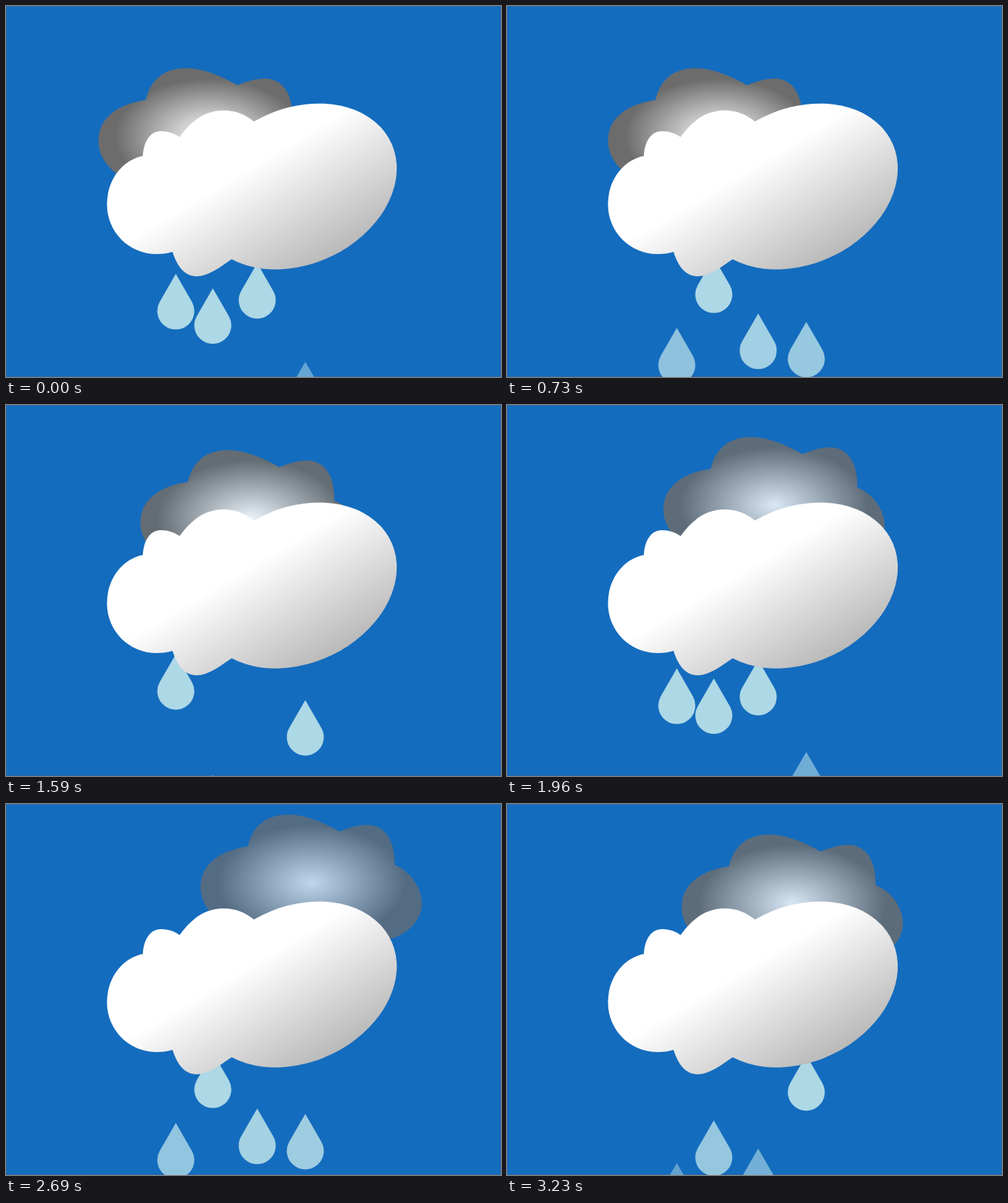
Write an HTML page that moves like this. It is 669 px wide and 501 px high and loops after 3330 ms.

```html
<!DOCTYPE html>
<html lang="en">
<head>
<meta charset="utf-8">
<title>Rain clouds</title>
<style>
  html, body { margin: 0; width: 100%; height: 100%; overflow: hidden; background: #146cbe; }
  svg { display: block; width: 100%; height: 100%; }
</style>
</head>
<body>
<svg viewBox="0 0 669 501">
  <defs>
    <radialGradient id="storm" gradientUnits="userSpaceOnUse" cx="0" cy="0" r="1"
      gradientTransform="translate(149.5 92) scale(149.5 92)">
      <stop offset="0" stop-color="#fff"/>
      <stop offset=".85" stop-color="#6c6c6c"/>
    </radialGradient>
    <linearGradient id="fluff" x1="0" y1="0" x2="1" y2="1">
      <stop offset=".43" stop-color="#fff"/>
      <stop offset="1" stop-color="#9c9c9c"/>
    </linearGradient>
  </defs>
  <rect width="669" height="501" fill="#146cbe"/>
  <rect x=".5" y=".5" width="668" height="500" fill="none" stroke="#666" stroke-opacity=".3"/>
  <path id="dark" fill="url(#storm)" d="M24 142C8 130 0 114 0 98C0 66 28 48 64 43C71 14 90 0 118 0
    C143 0 168 12 188 23C200 18 212 14 225 14C251 14 263 38 262 68C284 77 299 99 299 120
    C299 142 282 160 257 168C240 174 200 184 150 184Z"/>
  <g id="rain" fill="#add8e6"></g>
  <path fill="url(#fluff)" d="M335 156A140 105 -25 1 1 305 342C290 352 274 365 258 365
    C240 365 231 350 225 332C219 334 212 335 204 335C166 335 136.5 305 136.5 268
    C136.5 235 157 208 185 202.5C186 183 195 169 209 169C219 169 228 172 234.5 177
    C251 154 270 141 294 141C309 141 323 146 335 156Z"/>
</svg>
<script>
const LOOP = 3330;

// The picture is held in 100 ms steps, counted anew from each of these moments.
const STEP = 100;
const BEATS = [0, 130, 1110, 1590, 1740, 2340, 2690, 2850, 3130];

// Dark cloud key points
const ROUTE = [
  { t: 0, x: 125, y: 84, alpha: 1 },
  { t: 1135, x: 143, y: 84, alpha: 1 },
  { t: 2600, x: 267.5, y: 9.8, alpha: 0.71 },
  { t: LOOP, x: 231, y: 46.3, alpha: 0.85 }
];

const NS = 'http://www.w3.org/2000/svg';
const dark = document.getElementById('dark');
const rain = document.getElementById('rain');

function makeDrop(x, period, start) {
  const node = document.createElementNS(NS, 'path');
  node.setAttribute('d', 'M0 0L21.65 37.5A25 25 0 1 1 -21.65 37.5Z');
  rain.appendChild(node);
  return { node, x, period, start };
}

const drops = [
  makeDrop(229.5, 2000, 1402),
  makeDrop(279.5, 1000, 604),
  makeDrop(339.5, 2000, 1597),
  makeDrop(404.5, 1000, 108)
];

const mix = (a, b, k) => a + (b - a) * k;

function place(node, x, y, alpha) {
  node.setAttribute('transform', `translate(${x.toFixed(2)} ${y.toFixed(2)})`);
  node.setAttribute('opacity', alpha.toFixed(3));
}

function hold(now) {
  const beat = BEATS.filter(b => b <= now).pop();
  return beat + Math.floor((now - beat) / STEP) * STEP;
}

function drawCloud(t) {
  const i = ROUTE.findIndex(p => p.t > t);
  const a = ROUTE[i - 1], b = ROUTE[i];
  const k = (t - a.t) / (b.t - a.t);
  place(dark, mix(a.x, b.x, k), mix(a.y, b.y, k), mix(a.alpha, b.alpha, k));
}

// Slow while emerging, then twice as fast, fading in the second half.
function drawDrop(d, t) {
  const p = ((t - d.start + d.period) % d.period) / d.period;
  const y = 327 + 100 * p + 100 * Math.max(0, p - 0.25);
  const fade = Math.max(0, 2 * p - 1);
  place(d.node, d.x, y, mix(1, 0.4, fade));
}

function draw(ms) {
  const t = hold(ms % LOOP);
  drawCloud(t);
  for (const d of drops) drawDrop(d, t);
}

const begin = performance.now();
function loop() {
  draw(performance.now() - begin);
  requestAnimationFrame(loop);
}
loop();
</script>
</body>
</html>
```
